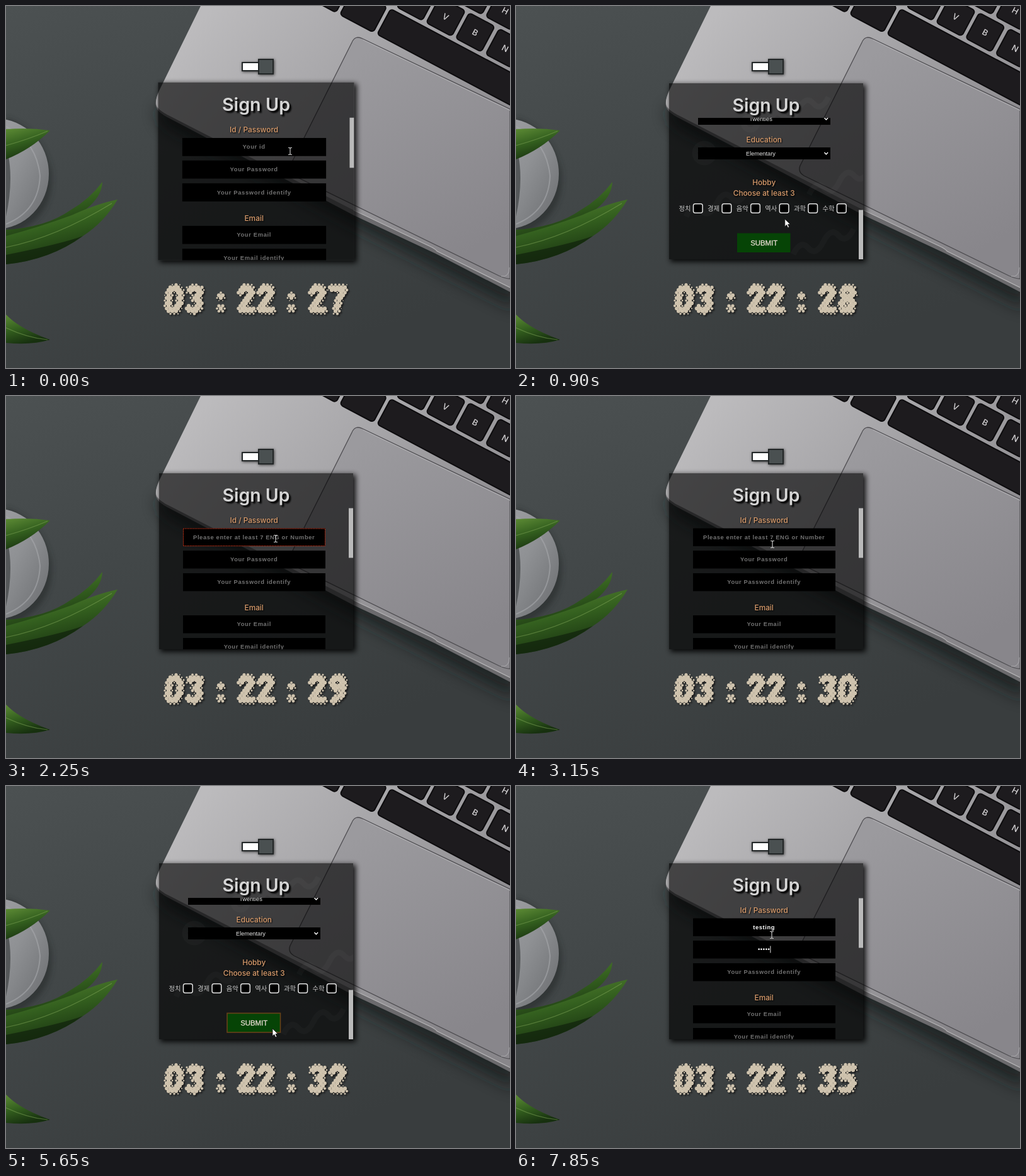
These frames come from a looping animation (800x576 px, 8 s). An HTML page:

```html
<!DOCTYPE html>
<html lang="en">
<head>
<meta charset="utf-8">
<title>Sign Up</title>
<style>
html, body { margin: 0; width: 100%; height: 100%; overflow: hidden; background: #3d4243; }
svg { display: block; width: 100vw; height: 100vh; }
text { text-anchor: middle; }
.title { font: 600 28.5px Inter, sans-serif; fill: #d6d6d6; filter: drop-shadow(3px 3px 1px #000); }
.label { font: 500 11.8px Inter, sans-serif; fill: #d99c6c; filter: drop-shadow(1px 1px 1px #000); }
.hint, .value { font: bold 9.35px "Liberation Sans", Arial, sans-serif; letter-spacing: .62px; fill: #717171; }
.value { fill: #fff; }
.option { font: 9.3px "Liberation Sans", Arial, sans-serif; fill: #e4e4e4; }
.hobby { font: 10.3px "Noto Sans CJK KR", "Noto Sans CJK", sans-serif; fill: #c9c9c9; }
.submit { font: 11.4px "Liberation Sans", Arial, sans-serif; fill: #eaddd4; stroke: #eaddd4; stroke-width: .3; }
.key { font: 500 13px Inter, sans-serif; fill: #d6d4d6; }
.alert { fill: none; stroke: #d8391c; stroke-dasharray: 1.6 1; }
.caret { stroke: #e8e8e8; }
</style>
</head>
<body>
<svg viewBox="0 0 800 576" preserveAspectRatio="none">
  <defs>
    <linearGradient id="desk" x1="0" y1="0" x2=".55" y2="1">
      <stop offset="0" stop-color="#4c5152"/><stop offset=".45" stop-color="#424748"/><stop offset="1" stop-color="#393d3e"/>
    </linearGradient>
    <linearGradient id="metal" gradientUnits="userSpaceOnUse" x1="300" y1="30" x2="690" y2="390">
      <stop offset="0" stop-color="#bcbbbd"/><stop offset=".4" stop-color="#a8a7aa"/><stop offset="1" stop-color="#88868a"/>
    </linearGradient>
    <linearGradient id="pad" gradientUnits="userSpaceOnUse" x1="540" y1="90" x2="720" y2="400">
      <stop offset="0" stop-color="#9b9a9e"/><stop offset="1" stop-color="#88868b"/>
    </linearGradient>
    <linearGradient id="pot" x1="0" y1="0" x2="1" y2=".6">
      <stop offset="0" stop-color="#adaeb2"/><stop offset=".7" stop-color="#8f9194"/><stop offset="1" stop-color="#77797c"/>
    </linearGradient>
    <linearGradient id="leaf" x1="0" y1="0" x2=".4" y2="1">
      <stop offset="0" stop-color="#5d8b35"/><stop offset=".5" stop-color="#34601f"/><stop offset="1" stop-color="#17300f"/>
    </linearGradient>
    <filter id="soft" x="-20%" y="-20%" width="140%" height="140%"><feGaussianBlur stdDeviation="4"/></filter>
    <filter id="wide" x="-30%" y="-30%" width="160%" height="160%"><feGaussianBlur stdDeviation="13"/></filter>
    <clipPath id="outside"><path clip-rule="evenodd" d="M0 0H800V576H0zM243 123H551V403H243z"/></clipPath>
    <clipPath id="inside"><path d="M243 123H551V403H243z"/></clipPath>
    <clipPath id="view"><path d="M243 178H551V403H243z"/></clipPath>
  </defs>

  <rect width="800" height="576" fill="url(#desk)"/>

  <g id="laptop">
    <path d="M238 165L250 190 552 350 810 482V430L300 150z" fill="#181a1b" opacity=".75" filter="url(#wide)"/>
    <path d="M309 0L243 135Q234 156 240 164 244 171 258 178L552 333 682 394 800 455V0z" fill="#6b6a6d"/>
    <path d="M309 0L243 135Q234 155 241 162 246 168 258 174L552 325 672 382Q681 386 684 390L800 448V0z" fill="url(#metal)"/>
    <path d="M552 325L672 382Q681 386 684 390L800 448" fill="none" stroke="#b5b4b6" stroke-width="1.2"/>
    <path d="M566 52L800 164V434Q793 434 782 429L457 270Q447 264 451 254L549 58Q554 46 566 52z" fill="url(#pad)" stroke="#4f4e52" stroke-width="1.3"/>
    <path d="M567 54L800 166" stroke="#b4b3b6" fill="none"/>
    <path d="M799 416Q799 432 786 430" stroke="#a9a8ab" fill="none"/>
    <g id="keys" transform="translate(698 17) rotate(28)" fill="#1d1b1e" stroke="#0c0b0d" stroke-width="2"></g>
  </g>

  <g id="plant">
    <path d="M0 178Q56 196 72 262 80 340 0 366z" fill="#25292a" opacity=".6" filter="url(#soft)"/>
    <ellipse cx="-16" cy="267" rx="84" ry="88" fill="url(#pot)"/>
    <path d="M0 192Q48 214 54 270 52 326 0 347" fill="none" stroke="#a7a9ac" stroke-width="2" opacity=".6"/>
    <path d="M0 222Q14 270 0 335z" fill="#55585a"/>
    <g fill="url(#leaf)">
      <path d="M0 196Q36 193 70 198 40 228 0 244z"/>
      <path d="M0 356Q64 352 102 325 132 308 153 280 152 304 126 324 88 350 50 368L0 380z"/>
      <path d="M0 366Q52 352 104 333 146 314 177 308 156 344 122 366 70 404 0 411z"/>
      <path d="M0 491Q22 514 70 531 40 540 0 536z"/>
    </g>
    <path d="M0 384Q80 368 168 314M0 222Q36 212 66 199M0 512Q34 528 66 531" fill="none" stroke="#83a95a" stroke-width="1.2" opacity=".5"/>
    <path d="M0 411Q70 404 122 366 90 378 0 396z" fill="#11220c" opacity=".7"/>
  </g>

  <g id="toggle" stroke="#222627" stroke-width="2" style="filter:drop-shadow(1px 1px 2px #000a)">
    <rect x="375" y="90" width="30" height="13" fill="#fff"/>
    <rect x="401" y="85" width="23" height="23" fill="#4a5051"/>
  </g>

  <g id="panel">
    <g clip-path="url(#outside)"><rect x="245" y="125" width="310" height="282" opacity=".9" filter="url(#soft)"/></g>
    <rect x="243" y="123" width="308" height="280" fill="#000" opacity=".63"/>
    <g clip-path="url(#inside)"><g id="waves" fill="none" stroke="#fff" stroke-opacity=".025" stroke-width="9"></g></g>
    <text class="title" x="397" y="168">Sign Up</text>
    <g clip-path="url(#view)">
      <g id="form"></g>
      <rect id="thumb" x="544" y="179" width="7" height="79" fill="#bababa"/>
    </g>
  </g>

  <g id="clock" fill="#cfc3ae" style="filter:drop-shadow(2px 2px 1px #1a1a1a)"></g>

  <g id="beam" fill="none">
    <path d="M-3 -5.5H-1L0 -4.5 1 -5.5H3M0 -4.5V4.5M-3 5.5H-1L0 4.5 1 5.5H3" stroke="#c9c9c9" stroke-width="1.2"/>
  </g>
  <path id="arrow" d="M0 0V12L2.8 9.4 4.8 13.8 6.8 12.9 4.9 8.6H8.6z" fill="#fff" stroke="#111" stroke-width=".8"/>
</svg>

<script>
const LOOP = 8000, RANGE = 416, MID = 393.7;
const $ = id => document.getElementById(id);
const clamp = (v, lo = 0, hi = 1) => Math.min(hi, Math.max(lo, v));
const smooth = p => p * p * (3 - 2 * p);
const ramp = (t, from, to) => smooth(clamp((t - from) / (to - from)));
const text = (cls, x, y, str, id = "") => `<text class="${cls}" x="${x}" y="${y}" id="${id}">${str}</text>`;
const box = (x, y, w, h, more = "") => `<rect x="${x}" y="${y}" width="${w}" height="${h}" ${more}/>`;

// Keyboard, drawn in its own tilted axes
const key = (u, v, char = "", w = 46) =>
  box(u - 23, v - 23, w, 46, 'rx="5"') +
  (char && `<g stroke="none">${text("key", u, v + 5, char)}</g>`);
$("keys").innerHTML =
  key(-53, 0) + key(0, 0, "V") + key(53, 0, "B") + key(107, 0, "N") +
  key(-27, -53) + key(26, -53) + key(79, -53, "H") + key(132, -53) +
  key(-60, 53, "", 270) + key(-127, 53, "", 60) + key(-180, 53);

// Faint pattern behind the scrolled form
const wave = (x, y) => `<path d="M${x} ${y}q12 -24 24 -10t24 -10 24 -10 24 -10"/>`;
$("waves").innerHTML = wave(270, 335) + wave(440, 395) + wave(400, 185) + wave(465, 300) +
  '<circle cx="299" cy="234" r="15"/><circle cx="372" cy="186" r="11"/>';

// Form rows
const label = (y, str) => text("label", MID, y + 4, str);
const field = (y, hint, id = "") =>
  box(281, y, 226, 28.5) + text("hint", MID, y + 17.3, hint, id && id + "Hint") +
  (id && text("value", MID, y + 17.3, "", id + "Value") +
    box(281.5, y + .5, 225, 27.5, `class="alert" id="${id}Alert"`) +
    `<path class="caret" id="${id}Caret" d="M0 ${y + 8.5}v11"/>`);
const select = (y, str) => box(289, y, 210, 19) + text("option", 388.5, y + 13, str) +
  `<path d="M489.5 ${y + 8}l2.8 3 2.8 -3" fill="none" stroke="#fff" stroke-width="1.4"/>`;
const hobbies = ["정치", "경제", "음악", "역사", "과학", "수학"];
const checks = y => hobbies.map((name, i) => {
  const x = 268 + i * 45.6;
  return text("hobby", x, y + 3.8, name) +
    box(x + 13.5, y - 7.3, 14.6, 14.6, 'rx="3" stroke="#e2e2e2" stroke-width="1.5"');
}).join("");

$("form").innerHTML =
  label(198, "Id / Password") + field(210.5, "", "id") + field(246, "", "pw") +
  field(282, "Your Password identify") +
  label(337, "Email") + field(349, "Your Email") + field(385, "Your Email identify") +
  label(440, "Name") + field(452, "Your Name") +
  label(507, "Phone") + field(519, "Your Phone") +
  label(574, "Age") + select(586, "Twenties") +
  label(629, "Education") + select(641, "Elementary") +
  label(697, "Hobby") + label(714, "Choose at least 3") + checks(738) +
  box(351, 777.5, 84.5, 30.5, 'id="button" fill="#064406" stroke-width="1.6"') +
  text("submit", MID, 797, "SUBMIT");

// Halftone clock: dot size falls off with distance to the digit's strokes
const glyphs = {
  0: "10,9 19,6 25,13 23,33 18,42 9,42 5,34 7,16 10,9",
  1: "8,14 18,6 15,43",
  2: "7,13 13,6 22,7 24,14 20,22 7,41 25,42",
  3: "7,10 15,6 24,9 23,18 15,23 23,28 22,38 14,43 6,39",
  4: "20,43 24,6 5,32 27,32",
  5: "25,6 11,6 8,22 20,21 24,30 19,41 6,42",
  7: "6,7 26,7 18,22 13,43",
  8: "15,23 8,16 12,7 22,7 24,16 15,23 23,31 20,42 9,42 6,33 15,23",
  9: "23,20 12,24 7,16 11,7 21,6 25,14 22,32 10,43"
};
const toLine = s => s.split(" ").map(p => p.split(",").map(Number));
function segDist(x, y, [ax, ay], [bx, by]) {
  const dx = bx - ax, dy = by - ay;
  const k = clamp(((x - ax) * dx + (y - ay) * dy) / (dx * dx + dy * dy || 1));
  return Math.hypot(x - ax - k * dx, y - ay - k * dy);
}
function dots(lines, ox, reach = 8) {
  let out = "";
  for (let row = 0; row < 12; row++) {
    for (let col = 0; col < 6; col++) {
      const x = col * 6 + (row % 2) * 3, y = 1.5 + row * 4.2;
      const d = Math.min(...lines.flatMap(l => l.slice(1).map((p, i) => segDist(x, y, l[i], p))));
      const r = Math.min(3.1, (reach - d) * .75);
      if (r > .8) out += `<circle cx="${ox + x}" cy="${442 + y}" r="${r.toFixed(2)}"/>`;
    }
  }
  return out;
}
const digit = (n, x) => dots([toLine(glyphs[n])], x);
const colon = x => dots([toLine("15,20 15,20"), toLine("15,39 15,39")], x, 8.5);
const fixed = digit(0, 252) + digit(3, 284) + colon(326) + digit(2, 366) + digit(2, 397) + colon(438);
let shown = 0;
function setClock(sec) {
  if (sec === shown) return;
  shown = sec;
  $("clock").innerHTML = fixed + digit(Math.floor(sec / 10), 479) + digit(sec % 10, 511);
}

// Pointer stops: time, x, y
const stops = [
  [0, 451, 231], [250, 451, 231], [850, 427, 336], [1200, 423, 386], [1500, 423, 386],
  [2150, 428, 227], [2300, 428, 227], [3050, 455, 216], [3150, 407, 236], [4100, 407, 236],
  [4200, 407, 230], [4980, 407, 230], [5550, 423, 386], [6000, 423, 386], [6350, 406, 237], [LOOP, 406, 237]
];
function pointer(t) {
  const i = stops.findIndex(s => s[0] > t);
  const a = stops[i - 1], b = stops[i], p = ramp(t, a[0], b[0]);
  return [a[1] + (b[1] - a[1]) * p, a[2] + (b[2] - a[2]) * p];
}

const idKeys = [4100, 4200, 4250, 4400, 4500, 4650, 4800];
const pwKeys = [7200, 7350, 7500, 7650, 7800];
const pressed = (keys, t) => keys.filter(k => k <= t);

function setField(id, t, str, hint, keys, focus, blur, alert) {
  const hits = pressed(keys, t), value = str.slice(0, hits.length);
  $(id + "Value").textContent = value;
  $(id + "Hint").textContent = value ? "" : hint;
  $(id + "Alert").style.opacity = alert;
  const since = t - (hits.length ? hits[hits.length - 1] : focus);
  const on = t >= focus && t < blur && since % 1000 < 500;
  const width = value ? $(id + "Value").getComputedTextLength() : 0;
  $(id + "Caret").style.display = on ? "" : "none";
  $(id + "Caret").setAttribute("transform", `translate(${(MID + width / 2 + .5).toFixed(1)})`);
}

function draw(t) {
  const down = ramp(t, 30, 780) - ramp(t, 1430, 1830) + ramp(t, 4970, 5500) - ramp(t, 5980, 6350);
  const size = 1 + .01 * (1 - ramp(t, 0, 400));
  $("panel").setAttribute("transform", `translate(397 263) scale(${size}) translate(-397 -263)`);
  $("form").setAttribute("transform", `translate(0 ${-RANGE * down})`);
  $("thumb").setAttribute("y", 178.5 + 146 * down);
  $("waves").style.opacity = down;

  setField("id", t, "testing", t < 1450 ? "Your id" : "Please enter at least 7 ENG or Number",
    idKeys, 1600, 5900, ramp(t, 1800, 2200) - ramp(t, 2500, 3050));
  setField("pw", t, "•••••", t < 6000 ? "Your Password" : "Please enter at least 9 characters",
    pwKeys, 6150, LOOP, ramp(t, 6150, 6650) - ramp(t, 7050, 7600));

  const hover = ramp(t, 1020, 1200) - ramp(t, 1500, 1600) + ramp(t, 5400, 5600) - ramp(t, 6000, 6100);
  $("button").setAttribute("stroke", `rgba(104,66,24,${hover})`);

  const [x, y] = pointer(t), typing = down < .02 && y < 240;
  for (const [id, on] of [["beam", typing], ["arrow", !typing]]) {
    $(id).style.display = on ? "" : "none";
    $(id).setAttribute("transform", `translate(${x} ${y})`);
  }
  setClock(27 + Math.floor((t + 250) / 1000));
}

const start = performance.now();
function tick() {
  draw((performance.now() - start) % LOOP);
  requestAnimationFrame(tick);
}
tick();
</script>
</body>
</html>
```
